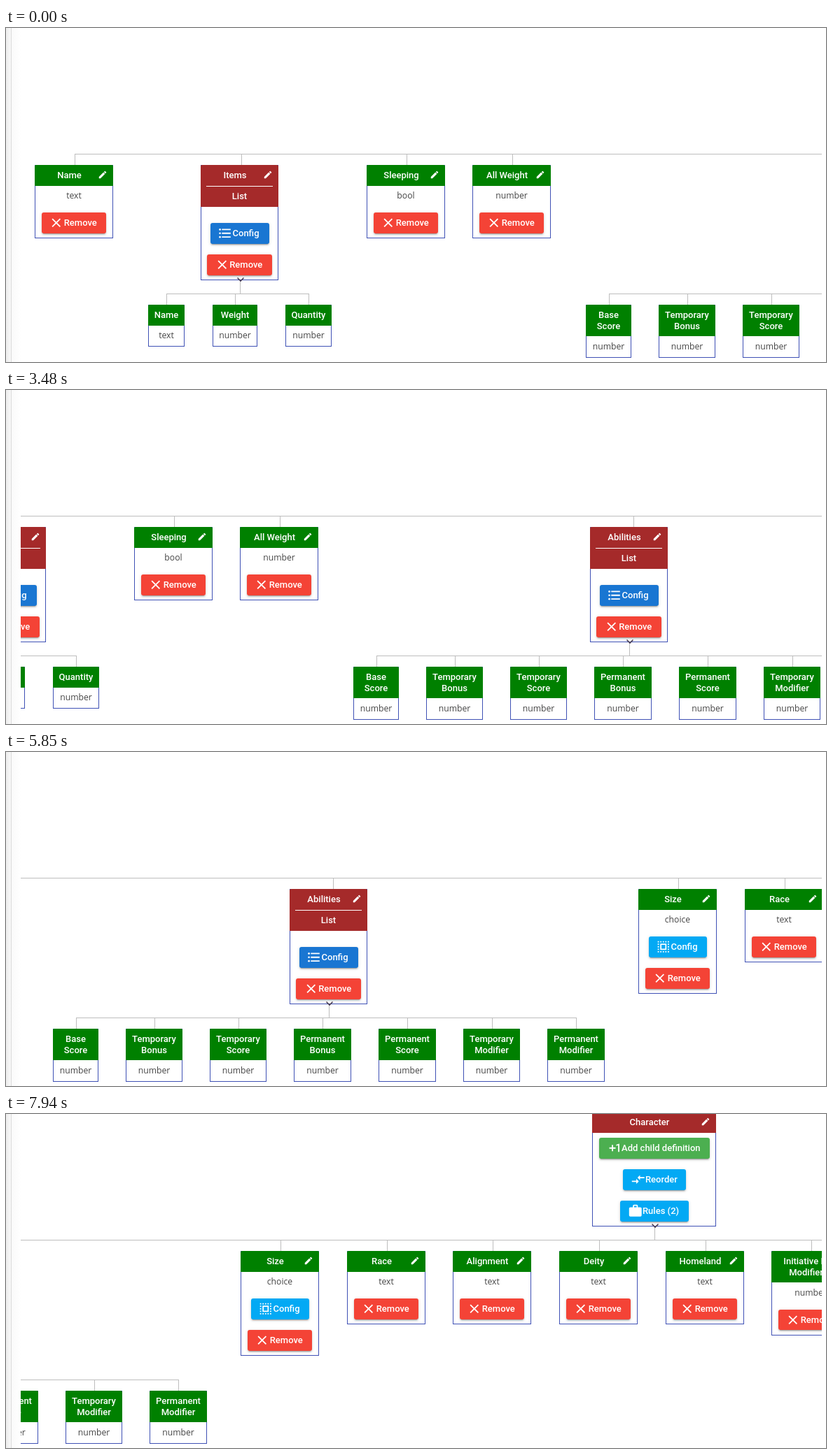
An HTML page that plays this animation: 1171x478 px, repeating every 8000 ms.

```html
<!DOCTYPE html>
<html lang="en">
<head>
<meta charset="utf-8">
<title>Definition tree</title>
<style>
html, body { margin: 0; width: 100%; height: 100%; overflow: hidden; background: #fff; }
#stage { position: relative; width: 1171px; height: 478px; overflow: hidden; background: #fff; }
#edge { position: absolute; left: 0; top: 0; width: 7px; height: 478px;
  background: linear-gradient(90deg, #ececec, #f8f8f8); border-right: 1px solid #dcdcdc; }
#fade { position: absolute; left: 8px; top: 0; width: 13px; height: 478px;
  background: linear-gradient(90deg, #fafafa, #fff); }
#view { position: absolute; left: 21px; top: 0; width: 1144px; height: 478px; overflow: hidden; }
#tree { position: absolute; left: -21px; top: 0; will-change: transform; }
#tree div, #tree svg { position: absolute; box-sizing: border-box; }
.line { background: #bdbdbd; }
.box { border: 1px solid #3f51b5; background: #fff; }
.head { border-radius: 2px 2px 0 0; }
.title, .button { font: 500 13px/15.5px Roboto, sans-serif; color: #fff; white-space: pre; }
.title { text-align: center; }
.type { font: 12.2px/16px "Open Sans", sans-serif; color: #444; text-align: center; }
.button { height: 29.5px; line-height: 29px; padding-left: 32px; border-radius: 3px;
  box-shadow: 0 3px 1px -2px rgba(0,0,0,.2), 0 2px 2px rgba(0,0,0,.14), 0 1px 5px rgba(0,0,0,.12); }
.button svg { left: 10.5px; top: 4px; }
</style>
</head>
<body>
<div id="stage">
  <div id="edge"></div>
  <div id="fade"></div>
  <div id="view"><div id="tree"></div></div>
</div>
<script>
const GREEN = '#008000', BROWN = '#a52a2a';
const tree = document.getElementById('tree');

const icons = {
  pencil: '<path d="M3 17.25V21h3.75L17.81 9.94l-3.75-3.75zM20.71 7.04c.39-.39.39-1.02 0-1.41l-2.34-2.34c-.39-.39-1.02-.39-1.41 0l-1.83 1.83 3.75 3.75z"/>',
  close: '<path d="M5.7 5.7 18.3 18.3M18.3 5.7 5.7 18.3" stroke="#fff" stroke-width="2"/>',
  list: '<path d="M7 6h14M7 12h14M7 18h14" stroke="#fff" stroke-width="2"/><circle cx="4" cy="6" r="1.5"/><circle cx="4" cy="12" r="1.5"/><circle cx="4" cy="18" r="1.5"/>',
  select: '<g fill="none" stroke="#fff" stroke-width="2"><path d="M4 4h16v16H4z" stroke-dasharray="2" stroke-dashoffset="1"/><path d="M8 8h8v8H8z"/></g>',
  plus: '<path d="M10 7H8v4H4v2h4v4h2v-4h4v-2h-4zM20 18h-2V7.4l-3 1V6.7L19.7 5h.3z"/>',
  arrows: '<path d="M9 14H2v2h7v3l4-4-4-4zM15 13v-3h7V8h-7V5l-4 4z"/>',
  work: '<path fill-rule="evenodd" d="M20 6h-4V4a2 2 0 0 0-2-2h-4a2 2 0 0 0-2 2v2H4a2 2 0 0 0-2 2v11a2 2 0 0 0 2 2h16a2 2 0 0 0 2-2V8a2 2 0 0 0-2-2zm-6 0h-4V4h4z"/>'
};

const buttons = {
  remove: ['Remove', 'close', '#f44336', 92.5],
  listConfig: ['Config', 'list', '#1976d2', 84],
  choiceConfig: ['Config', 'select', '#03a9f4', 83],
  add: ['Add child definition', 'plus', '#4caf50', 158],
  reorder: ['Reorder', 'arrows', '#03a9f4', 90],
  rules: ['Rules (2)', 'work', '#03a9f4', 98]
};

function add(cls, x, y, w, h, html = '', color = '') {
  const el = document.createElement('div');
  el.className = cls;
  el.style.cssText = `left:${x}px;top:${y}px;width:${w}px;` + (h ? `height:${h}px;` : '') +
    (color && `background:${color}`);
  el.innerHTML = html;
  tree.append(el);
}

const icon = (name, size, style = '') =>
  `<svg width="${size}" height="${size}" viewBox="0 0 24 24" fill="#fff" style="${style}">${icons[name]}</svg>`;

const hLine = (x1, x2, y) => add('line', x1, y, x2 - x1 + 1, 1);
const vLine = (x, y1, y2) => add('line', x, y1, 1, y2 - y1);

function addButton(mid, y, kind) {
  const [label, glyph, color, w] = buttons[kind];
  add('button', mid - w / 2, y, w, 0, icon(glyph, 21.5) + label, color);
}

function card(x, y, w, h, headH, title, color, editable) {
  add('box', x, y, w, h);
  add('head', x, y, w, headH, '', color);
  add('title', x, y + 7, editable ? w - 13 : w, 0, title);
  if (editable) add('', x + w - 22, y + 7, 14, 14, icon('pencil', 14, 'left:0;top:0'));
}

function chevron(x, y) {
  add('', x - 6, y - 4, 12, 8,
    '<svg width="12" height="8" style="left:0;top:0"><path d="M1.5 1.5 6 6l4.5-4.5" fill="none" stroke="#4a3f55" stroke-width="1.6"/></svg>');
}

function field(x, title, type, kinds = ['remove']) {
  const extra = title.includes('\n') ? 15.5 : 0;
  card(x, 196, 112, 60 + 45 * kinds.length + extra, 29.5 + extra, title, GREEN, true);
  add('type', x, 232 + extra, 112, 0, type);
  kinds.forEach((k, i) => addButton(x + 56, 264 + 45 * i + extra, k));
  vLine(x + 57, 180, 196);
}

function listField(x, stem, title, children) {
  vLine(stem, 180, 196);
  card(x, 196, 111, 165, 60, title, BROWN, true);
  add('', x + 8, 226, 95, 1, '', '#fff');
  add('title', x, 233, 111, 0, 'List');
  addButton(x + 55.5, 279, 'listConfig');
  addButton(x + 55.5, 324, 'remove');
  vLine(x + 56, 361, 380);
  chevron(x + 56.5, 360);
  const stems = children.map(([cx, w, name, type = 'number']) => {
    const extra = name.includes('\n') ? 15.5 : 0, mid = cx + Math.round(w / 2);
    vLine(mid, 380, 396);
    card(cx, 396, w, 60 + extra, 29.5 + extra, name, GREEN, false);
    add('type', cx, 432 + extra, w, 0, type);
    return mid;
  });
  hLine(stems[0], stems[stems.length - 1], 380);
}

hLine(98, 2900, 180);
field(41, 'Name', 'text');
listField(278, 336, 'Items', [[203, 52, 'Name', 'text'], [295, 64, 'Weight'], [399, 66, 'Quantity']]);
field(515, 'Sleeping', 'bool');
field(666, 'All Weight', 'number');
listField(1166, 1228, 'Abilities', [
  [828, 65, 'Base\nScore'], [932, 81, 'Temporary\nBonus'], [1052, 81, 'Temporary\nScore'],
  [1172, 82, 'Permanent\nBonus'], [1293, 82, 'Permanent\nScore'],
  [1414, 81, 'Temporary\nModifier'], [1534, 82, 'Permanent\nModifier']
]);
field(1664, 'Size', 'choice', ['choiceConfig', 'remove']);
['Race', 'Alignment', 'Deity', 'Homeland', 'Initiative M\nModifier'].forEach((name, i) =>
  field(Math.round(1815.7 + 151.6 * i), name, i < 4 ? 'text' : 'number'));

card(2166, -3, 177, 164, 29.5, 'Character', BROWN, true);
['add', 'reorder', 'rules'].forEach((k, i) => addButton(2255, 34 + 45 * i, k));
vLine(2255, 161, 180);
chevron(2255.5, 160);

// Moments at which the view scrolls: single ones, then even runs [first, last, count].
const times = [0, 500, 580, 730, 910, 980, 1140];
for (const [from, to, n] of [
  [1280, 2080, 11], [2160, 2940, 11], [3010, 3790, 11], [3860, 4630, 11],
  [4710, 5480, 11], [5560, 6310, 11], [6540, 7320, 11], [7390, 7940, 8]
]) for (let i = 0; i < n; i++) times.push(from + (to - from) * i / (n - 1));

// Scroll distance at some steps, joined by a smooth curve.
const knots = [[0, 0], [2, 11], [3, 20], [6, 41], [12, 89], [35, 332], [49, 523], [58, 653], [73, 903], [91, 1329]];

function slope(i) {
  const a = knots[Math.max(i - 1, 0)], b = knots[Math.min(i + 1, knots.length - 1)];
  return (b[1] - a[1]) / (b[0] - a[0]);
}

function scrollAt(step) {
  let i = 0;
  while (i < knots.length - 2 && step >= knots[i + 1][0]) i++;
  const [x0, y0] = knots[i], [x1, y1] = knots[i + 1];
  const d = x1 - x0, u = (step - x0) / d, v = 1 - u;
  return y0 * v * v * (1 + 2 * u) + y1 * u * u * (3 - 2 * u) +
    d * u * v * (slope(i) * v - slope(i + 1) * u);
}

const offsets = times.map((_, i) => Math.round(scrollAt(i)));
const start = performance.now();

function draw() {
  const t = Math.max(0, performance.now() - start) % 8000;
  let i = times.length - 1;
  while (times[i] > t) i--;
  tree.style.transform = `translateX(${-offsets[i]}px)`;
  requestAnimationFrame(draw);
}
draw();
</script>
</body>
</html>
```
